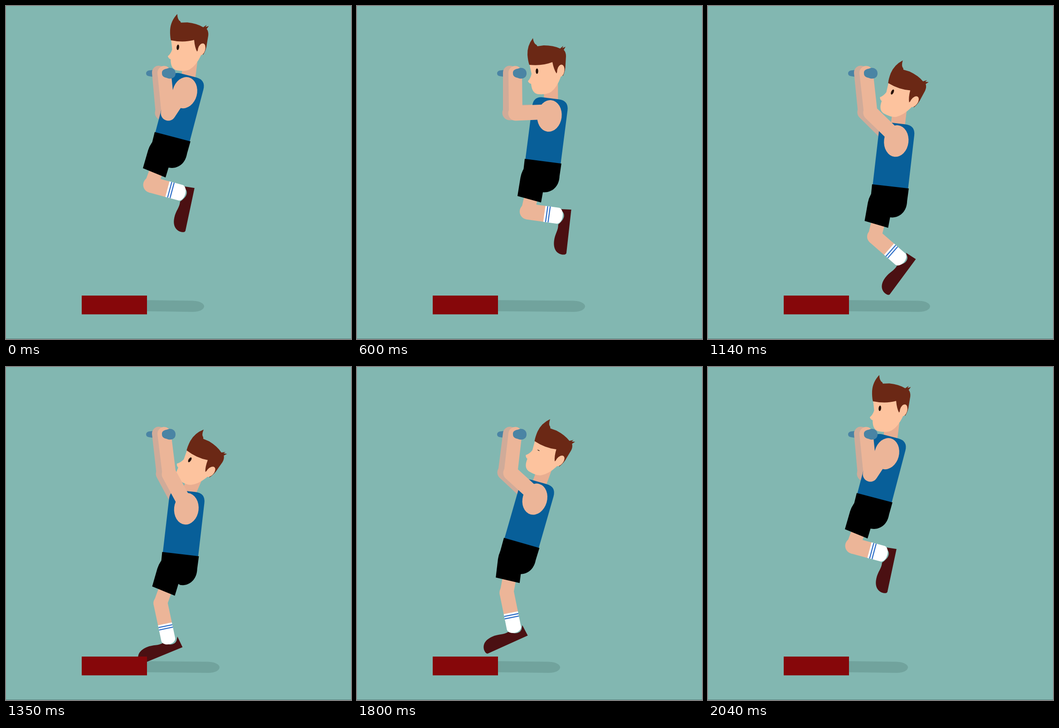
Animation, 761 px wide and 736 px high, one loop 2070 ms. Source, as an HTML page with a canvas:

```html
<!DOCTYPE html>
<html lang="en">
<head>
<meta charset="utf-8">
<title>Pull-up</title>
<style>
  html, body { margin: 0; width: 100%; height: 100%; overflow: hidden; background: #82b7b1; }
  canvas { display: block; width: 761px; height: 736px; }
</style>
</head>
<body>
<canvas id="stage" width="761" height="736"></canvas>
<script>
const ctx = document.getElementById('stage').getContext('2d');
const LOOP = 2070, STEP = 30;
const COLOR = {
  bg: '#82b7b1', shadow: '#71a39d', box: '#86070a', edge: '#56807c', bar: '#4a84a4',
  face: '#fdc39e', skin: '#ecb598', farSkin: '#d0ab99', neck: '#e9ae91',
  hair: '#6b2815', eye: '#27120a', shirt: '#085f99', shorts: '#000',
  sock: '#fff', stripe: '#2f6fc8', shoe: '#4b1012'
};

// Pose tracks: one value per time; the last pose repeats the first.
const TIMES = [0, 300, 600, 900, 1350, 1575, 1800, 2040];
const TRACKS = {
  x:      [329.5, 354.5, 371.5, 374, 346, 320, 325.5],
  y:      [279, 307, 338, 373, 409, 420, 378],
  tilt:   [14.7, 9.5, 7.3, 6.6, 6.6, 11, 16],
  headX:  [396.3, 404.3, 411.7, 429.3, 431, 412, 424.7],
  headY:  [68.3, 91, 119.3, 151.3, 191.7, 207, 169],
  headA:  [6, 2.4, 0, 13, 31.5, 32, 27.5],
  thigh:  [22.4, 17.1, 15.5, 13, 22.4, 36, 13],
  shin:   [15, 11, 8, 8, 78, 92, 78.5],
  foot:   [-78, -82, -83.6, -80, -22.4, -2, -24.3],
  reach:  [0, 0, 0, 0, 0.95, 1, 0.8],
  elbowX: [358, 350, 350, 356, 360, 346, 339],
  elbowY: [237, 237, 237, 235, 237, 238, 234],
  shadow: [437, 475, 503, 504, 471, 457, 448, 441]
};

// Monotone cubic interpolation, flat at both ends.
function sample(track, t) {
  const n = TIMES.length;
  if (t >= TIMES[n - 1]) return track[n - 1] ?? track[0];
  const v = i => track[i] ?? track[0];
  const slope = i => (v(i + 1) - v(i)) / (TIMES[i + 1] - TIMES[i]);
  const tangent = i => {
    if (i === 0 || i === n - 1) return 0;
    const a = slope(i - 1), b = slope(i);
    return a * b <= 0 ? 0 : 2 * a * b / (a + b);
  };
  let i = 0;
  while (t >= TIMES[i + 1]) i++;
  const h = TIMES[i + 1] - TIMES[i], u = (t - TIMES[i]) / h;
  const w = u * u * (3 - 2 * u);
  return v(i) * (1 - w) + v(i + 1) * w +
    h * u * (1 - u) * ((1 - u) * tangent(i) - u * tangent(i + 1));
}

const rad = deg => deg * Math.PI / 180;

function offset(p, deg, x, y) {
  const c = Math.cos(rad(deg)), s = Math.sin(rad(deg));
  return [p[0] + x * c - y * s, p[1] + x * s + y * c];
}

function fill(d, color) {
  ctx.fillStyle = color;
  ctx.fill(new Path2D(d));
}

function oval(x, y, rx, ry, deg, color) {
  ctx.fillStyle = color;
  ctx.beginPath();
  ctx.ellipse(x, y, rx, ry, rad(deg), 0, Math.PI * 2);
  ctx.fill();
}

function limb(points, width, color, cap = 'round') {
  ctx.strokeStyle = color;
  ctx.lineWidth = width;
  ctx.lineCap = cap;
  ctx.lineJoin = 'round';
  ctx.beginPath();
  points.forEach(p => ctx.lineTo(p[0], p[1]));
  ctx.stroke();
}

function local(p, deg, draw) {
  ctx.save();
  ctx.translate(p[0], p[1]);
  ctx.rotate(rad(deg));
  draw();
  ctx.restore();
}

function drawArm(hand, elbow, shoulder, color) {
  limb([hand, elbow], 30, color);
  limb([elbow, shoulder], 33, color);
}

function drawLeg(pose, hip) {
  const knee = offset(hip, pose.thigh, 4, 92);
  const k = pose.reach;
  const half = (35.5 - 4.5 * k) / 2, top = 37 + 10.5 * k, tip = 78 + 16 * k;

  const ankle = offset(knee, pose.shin, tip, 0);
  const heel = offset(ankle, pose.foot, 17 + 8 * k, 17);
  local(heel, pose.foot, () => fill(
    'M0 0L-97 0Q-101 -1 -101 -9C-100 -23 -89 -30 -73 -30C-57 -30 -49 -23 -36 -25' +
    'Q-18 -8 -7 -18L-1.5 -26Z', COLOR.shoe));

  limb([hip, knee], 30, COLOR.skin);
  limb([knee, offset(knee, pose.shin, top + 1, 0)], half * 2, COLOR.skin, 'butt');
  oval(knee[0], knee[1], half, half, 0, COLOR.skin);

  local(knee, pose.shin, () => {
    const s = tip - 10;
    fill(`M${top} ${-half}L${s} ${-half}C${tip + 3} ${-half * 0.8} ${tip + 3} ${half * 0.8} ${s} ${half}L${top} ${half}Z`,
      COLOR.sock);
    ctx.fillStyle = COLOR.stripe;
    for (const d of [4, 9.5]) ctx.fillRect(top + d, -half, 2.3, half * 2);
  });

  local(hip, pose.thigh, () => fill(
    'M-27 65L-31.5 24Q-33 6 -25 -8Q0 -22 20 -8L27 65Z', COLOR.shorts));
}

function drawHead(pose, eyeOpen) {
  local([pose.headX, pose.headY], pose.headA, () => {
    ctx.translate(-411.7, -119.3);
    fill('M379 122L385 150Q383 160 377 166Q379 171 384 172Q386 195 402 195' +
      'Q419 196 428 190Q441 180 449 158L456 115Z', COLOR.face);
    fill('M388 71Q375 88 376 108Q377 121 380 130Q408 133 431 124Q434 140 440 149' +
      'L446 138L454 155Q460 144 460 128L461 111Q461 102 456 97L460 90L453 93L455 88' +
      'L448 94Q433 87 412 87L398 89L396 86Q390 84 388 71Z', COLOR.hair);
    oval(449.5, 143, 8, 13.5, 10, COLOR.face);
    oval(397, 144, 2.8, Math.max(0.6, 6 * eyeOpen), 0, COLOR.eye);
  });
}

function drawScene(t) {
  const pose = {};
  for (const name in TRACKS) pose[name] = sample(TRACKS[name], t);

  ctx.fillStyle = COLOR.bg;
  ctx.fillRect(0, 0, 761, 736);
  ctx.fillStyle = COLOR.edge;
  ctx.fillRect(0, 735, 761, 1);

  const end = pose.shadow, neck = end - 25;
  fill(`M300 650L${neck} 651.5C${end - 9} 652 ${end} 658 ${end} 663.5` +
    `C${end} 670 ${end - 9} 676 ${neck} 676L300 674.5Z`, COLOR.shadow);

  const waist = [pose.x, pose.y];
  const body = (x, y) => offset(waist, pose.tilt, x, y);
  const shoulder = body(38, -110), elbow = [pose.elbowX, pose.elbowY];

  fill('M327 141L315 142.5Q309 144 309 149Q309 154 315 155L327 157Z', COLOR.bar);
  drawArm([337, 147], [elbow[0] - 13, elbow[1] - 1],
    [shoulder[0] - 13, shoulder[1]], COLOR.farSkin);

  const jaw = offset([pose.headX, pose.headY], pose.headA, 16, 52);
  limb([jaw, body(40, -132)], 31, COLOR.neck, 'butt');
  drawHead(pose, Math.min(1, Math.abs(t - 1800) / 120));

  drawLeg(pose, body(29, 23));
  local(waist, pose.tilt, () => {
    fill('M0 2L0 -118Q0 -140 22 -140L56 -140Q78.5 -140 78.5 -118L78.5 2Z', COLOR.shirt);
    fill('M-1.5 0L80 0L79.5 28C82 56 62 69 46 68L24 56L-1 35Z', COLOR.shorts);
  });

  drawArm([349, 147.5], elbow, shoulder, COLOR.skin);
  const cap = body(40.5, -101);
  oval(cap[0], cap[1], 27, 35, pose.tilt, COLOR.skin);
  fill('M344 149C343 141 351 139 355 138.5C364 134 374 139 374 149' +
    'C374 159 364 163 355 159C350 158 344 156 344 149Z', COLOR.bar);

  ctx.fillStyle = COLOR.box;
  ctx.fillRect(167, 640, 144, 41.5);
}

const start = performance.now();
function tick() {
  const t = (performance.now() - start) % LOOP;
  drawScene(Math.floor(t / STEP) * STEP);
  requestAnimationFrame(tick);
}
tick();
</script>
</body>
</html>
```
